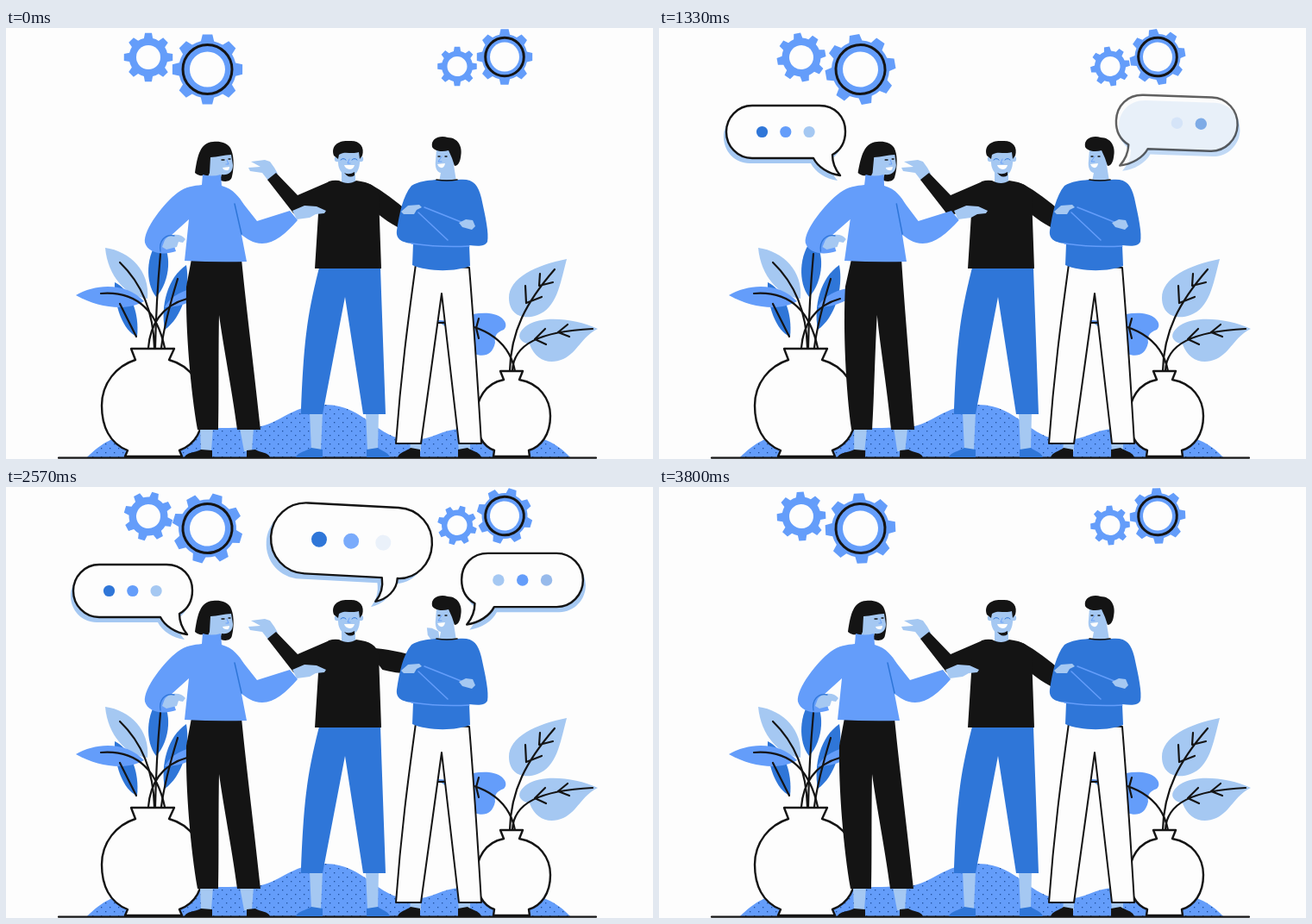
Recreate the animation shown at these times as an HTML page with a canvas. Size 750x500 px, loop 3.83 s.

```html
<!DOCTYPE html>
<html lang="en">
<head>
<meta charset="utf-8">
<title>Team talk</title>
<style>
html, body { margin: 0; width: 100%; height: 100%; overflow: hidden; background: #fdfdfd; }
canvas { display: block; width: 750px; height: 500px; }
</style>
</head>
<body>
<canvas id="stage" width="750" height="500"></canvas>
<script>
const ctx = document.getElementById('stage').getContext('2d');
const LOOP = 3830;
const PAPER = '#fdfdfd', INK = '#141414', SKY = '#649dfa', BLUE = '#2f76d8', PALE = '#a5c8f2';

const clamp = v => Math.max(0, Math.min(1, v));
const smooth = v => { v = clamp(v); return v * v * (3 - 2 * v); };
const hold = (t, a, b, c, d) => smooth((t - a) / (b - a)) * (1 - smooth((t - c) / (d - c)));

const cache = {};
const path = d => cache[d] || (cache[d] = new Path2D(d));
function fill(color, d) { ctx.fillStyle = color; ctx.fill(path(d)); }
function line(d, color = INK, w = 2.2) {
  ctx.strokeStyle = color;
  ctx.lineWidth = w;
  ctx.stroke(path(d));
}
function outlined(d, w = 2.4) { fill(PAPER, d); line(d, INK, w); }
function disc(x, y, r, color) {
  ctx.fillStyle = color;
  ctx.beginPath();
  ctx.arc(x, y, r, 0, Math.PI * 2);
  ctx.fill();
}
function turned(x, y, deg, draw) {
  ctx.save();
  ctx.translate(x, y);
  ctx.rotate(deg * Math.PI / 180);
  ctx.translate(-x, -y);
  draw();
  ctx.restore();
}

function gear(x, y, R, body, hole, ring, spin) {
  ctx.save();
  ctx.translate(x, y);
  ctx.rotate(spin);
  ctx.fillStyle = SKY;
  ctx.beginPath();
  for (let i = 0; i < 8; i++) {
    const a = i * Math.PI / 4;
    for (const [r, off] of [[body, -.23], [R, -.14], [R, .14], [body, .23]])
      ctx.lineTo(r * Math.cos(a + off), r * Math.sin(a + off));
    ctx.arc(0, 0, body, a + .23, a + Math.PI / 4 - .23);
  }
  ctx.fill();
  disc(0, 0, hole, PAPER);
  if (ring) {
    ctx.strokeStyle = INK;
    ctx.lineWidth = 3;
    ctx.beginPath();
    ctx.arc(0, 0, ring, 0, Math.PI * 2);
    ctx.stroke();
  }
  ctx.restore();
}

function gears(t) {
  const spin = t / LOOP * Math.PI * 2;
  gear(165, 34, 28.5, 22.5, 14, 0, spin);
  gear(233.5, 48, 41, 33.5, 20.5, 28.5, spin);
  gear(523, 44.5, 23, 18, 11.5, 0, spin);
  gear(578, 33.5, 32.5, 26.5, 17, 22.3, spin);
}

const HILL = 'M93 499C112 480 125 474 150 470C200 463 250 465 290 463C318 460 328 438 370 437C418 438 428 477 470 478C495 478 505 465 530 465C550 465 555 472 570 474C615 466 640 482 655 499Z';
function ground() {
  fill(SKY, HILL);
  ctx.save();
  ctx.clip(path(HILL));
  ctx.fillStyle = '#1f4f9c';
  for (let row = 0; row < 14; row++)
    for (let x = 90 + row % 2 * 5; x < 660; x += 10) ctx.fillRect(x, 437 + row * 5, 1.3, 1.3);
  ctx.restore();
  line('M61 498.700H684');
}

function leftPlant() {
  fill(BLUE, 'M126 295C143 303 155 328 152 358C136 352 125 322 126 295Z');
  fill(BLUE, 'M178 245C193 258 191 294 174 312C161 296 162 262 178 245Z');
  fill(BLUE, 'M209 275C214 302 204 336 184 350C179 322 187 290 209 275Z');
  fill(SKY, 'M184 324C192 308 212 300 237 301C224 315 204 324 184 324Z');
  fill(PALE, 'M115 255C144 259 167 282 164 314C139 311 118 288 115 255Z');
  fill(SKY, 'M81 310C104 296 140 295 160 317C140 329 108 325 81 310Z');
  line('M132 320L151 358M179 262Q174 318 173 371M199 291Q184 340 180 371M132 272C157 296 171 330 172 371');
  line('M110 308C148 305 174 325 184 371M210 314C180 322 167 345 165 371');
  outlined('M145 372H195L189 385C215 392 229 415 229 440C229 465 220 483 201 490L204 497H138L141 490C120 482 111 462 111 438C111 412 128 392 150 385Z');
}

function rightPlant() {
  fill(PALE, 'M650 268C614 275 583 290 583 313C583 334 601 339 616 333C638 325 642 299 650 268Z');
  fill(PALE, 'M686 349C660 337 622 333 604 345C590 355 594 364 607 367C614 386 630 391 646 384C663 376 667 358 686 349Z');
  fill(SKY, 'M497 338C520 344 532 329 560 331C578 333 583 345 577 350C568 353 566 358 567 365C564 380 553 382 543 378C525 365 515 345 497 340Z');
  line('M636 280C603 318 585 352 584 398M618 299L619 285M618 299L634 295M603 319L602 299M603 319L621 312');
  line('M680 349C620 352 588 366 587 398M640 353L651 344M640 353L653 358M613 361L625 349M613 361L626 367');
  line('M500 342C548 340 583 360 590 398M545 348L548 337M545 348L548 360');
  outlined('M573 398H599L595 408C618 412 631 430 631 450C631 472 620 486 606 490L607 497H565L566 490C552 485 545 470 545 452C545 430 556 412 577 408Z');
}

function middleMan(t) {
  const wave = smooth(1 - Math.abs(t - 770) / 470);
  const reach = hold(t, 2000, 2500, 3250, 3700);

  turned(430, 195, -27 * reach, () => {
    fill(PALE, 'M493 201L496 193L501 196L506 203L503 212L494 208Z');
    fill(INK, 'M422 181C438 190 452 201 465 212L460 234C447 228 437 221 428 213Z');
  });

  fill(PALE, 'M352 446H367L365 490H354ZM417 446H432L431 490H419Z');
  fill(BLUE, 'M336 498C338 492 348 491 354 487L367 489V498ZM418 498V489L431 487C436 491 443 492 445 498Z');
  fill(BLUE, 'M363 278H434L440 448H414L393 312L367 448H342C345 360 350 330 363 278Z');
  fill(PALE, 'M389 161H405V181H389Z');
  turned(375, 191, -12 * wave, () => {
    fill(PALE, 'M304 177L297 168L283 166L281 162L295 161L284 155L300 153L306 155L311 162L315 169Z');
    fill(INK, 'M303 176L313 168L338 194L375 178L380 205L342 216Q335 219 331 212Z');
  });
  fill(INK, 'M386 177C393 181 400 181 406 177C422 179 430 184 432 194L435 279H358L363 200L374 178Q380 176 386 177Z');

  disc(384, 152, 3.2, PALE);
  disc(411, 152, 3.2, PALE);
  fill(PALE, 'M385 143H410V157C409 167 404 172 398 172C391 172 385 165 385 156Z');
  fill(INK, 'M392 168Q398 171 404 167V171Q399 174 395 171Z');
  fill(INK, 'M380 148C376 136 386 130 398 131C410 130 416 138 413 148L410 152L409 144C400 147 393 142 386 147L385 152Z');
  line('M388 153Q391 150 394 153M401 153Q404 150 407 153', BLUE, 1);
  line('M398 152L396 157H399', SKY, .9);
  fill(PAPER, 'M392 159H404Q403 164 398 164Q393 163 392 159Z');
}

function woman(t) {
  const lean = .0352 * hold(t, 250, 700, 1400, 1740);
  ctx.save();
  ctx.transform(1, 0, -lean, 1, lean * 497, 0);

  fill(PALE, 'M225 464H240L238 491H226ZM271 464H287L285 491H276Z');
  fill(INK, 'M207 498C209 492 219 493 226 489L239 490V498ZM279 498V490L289 489C295 493 304 492 306 498Z');
  fill(INK, 'M215 268H273C278 320 288 400 295 466H268C262 420 252 370 247 333C246 380 247 430 246 466H222C214 420 208 350 209 300Z');

  fill(INK, 'M240 132C225 133 222 148 219 168C224 173 231 171 236 172L249 177C255 179 261 178 262 172C265 160 264 146 260 139C256 133 248 131 240 132Z');
  fill(PALE, 'M237 150C245 150 253 147 261 147L263 159C263 167 258 171 250 170L248 177H232L236 168Z');
  line('M250 153H253M258 152H260', INK, 1.3);
  line('M256 153L258 158H255', SKY, .9);
  fill(PAPER, 'M251 162L259 161Q259 166 255 165Q252 165 251 162Z');

  fill(PALE, 'M332 212L346 206L360 207L371 212L369 215L359 216L352 220L337 222Z');
  fill(SKY, 'M228 170Q238 173 249 170L250 183C264 187 270 196 276 205L291 224L329 212L338 223C325 238 311 250 297 250C286 250 279 244 273 240L279 271Q243 272 207 270L212 222L191 241L197 259C183 264 165 262 161 249C159 234 183 203 199 191C208 184 218 183 227 182Z');
  fill(PALE, 'M184 246C190 238 203 238 208 245L205 249L200 248L198 254L186 257L181 254Z');
  line('M265 204L273 239', BLUE, 1.5);
  line('M195 241C184 239 177 247 179 259', BLUE, 1.3);
  ctx.restore();
}

function rightMan() {
  fill(PALE, 'M469 480H481V491H468ZM524 480H538V491H525Z');
  fill(INK, 'M454 498C456 492 464 491 469 487L480 489V498ZM524 498V489L535 487C541 491 549 492 551 498Z');
  outlined('M475 274L537 278C542 340 547 415 551 482H525L505 308L481 482H452C458 400 466 340 475 274Z', 2);

  fill(PALE, 'M499 141L514 140L518 150C523 148 524 156 519 159L522 178H502L504 168C499 167 497 161 498 154Z');
  fill(INK, 'M494 138C492 128 503 124 512 127C524 127 530 138 527 150C526 157 523 160 520 160L517 151L513 142C505 144 497 143 494 138Z');
  line('M501 149H503M509 149H511', INK, 1.3);
  line('M505 149L501 155H505', SKY, .9);
  fill(PAPER, 'M500 158L509 157Q508 163 504 162Q501 161 500 158Z');

  fill(BLUE, 'M498 176H524C541 174 547 181 551 197C556 220 560 238 558 248C555 254 546 253 537 252L538 276C522 283 488 283 471 275L472 250C456 249 452 243 453 235C456 215 460 195 470 183C478 178 488 177 498 176Z');
  line('M499 176Q511 178 523 176', INK, 1.6);
  line('M485 208L535 228M478 214L512 246M470 250Q505 255 537 253', SKY, 1.5);
  fill(PALE, 'M458 213L466 206L479 205L482 208L476 211L473 216L461 216Z');
  fill(PALE, 'M525 226L533 222L541 223L544 230L540 234L529 231Z');
}

const SMALL = {
  shape: 'M108 90H186C204 90 216 103 216 120C216 133 210 142 201 147C201 157 205 165 210 171C196 169 184 161 179 151H108C91 151 78 137 78 120.500C78 104 91 90 108 90Z',
  pivot: [210, 171], dots: [119.5, 120.5, 27.3, 6.6], shade: [-3, 6]
};
const LARGE = {
  shape: 'M344 26H449C473 26 490 45 490 67C490 89 474 108 452 108C452 122 441 133 428 136C434 128 436 118 434 108H344C321 108 303 90 303 67C303 44 321 26 344 26Z',
  pivot: [490, 140], dots: [359, 67.5, 37.2, 9], shade: [-5, 6.5]
};

// Dots fade in one by one, blink out in the same order, then return.
function dotAlpha(age, p, i) {
  const out = clamp((age - 1325 - i * 230) / 230);
  const back = clamp((age - 2080 - i * 100) / 150);
  return clamp(3 * (p - .05 - .215 * i)) * (1 - out + back * out);
}

function bubble(t, start, tilt, kind) {
  const age = t - start, p = clamp(age / 600);
  const alpha = clamp(p * 2) * (1 - smooth((t - 3430) / 290));
  if (alpha <= 0) return;
  turned(...kind.pivot, tilt * (1 - p) * (1 - p), () => {
    ctx.globalAlpha = alpha;
    ctx.save();
    ctx.translate(...kind.shade);
    fill(PALE, kind.shape);
    ctx.restore();
    outlined(kind.shape);
    const [x, y, gap, r] = kind.dots;
    [BLUE, SKY, PALE].forEach((c, i) => {
      ctx.globalAlpha = alpha * dotAlpha(age, p, i);
      disc(x + gap * i, y, r, c);
    });
  });
}

function bubbles(t) {
  bubble(t, 100, -4.5, SMALL);
  ctx.save();
  ctx.translate(598.5, 108);
  ctx.scale(-1.02, 1.02);
  ctx.translate(-147, -120.5);
  bubble(t, 1130, -4.5, SMALL);
  ctx.restore();
  bubble(t, 2240, 15, LARGE);
}

function draw(t) {
  ctx.globalAlpha = 1;
  ctx.fillStyle = PAPER;
  ctx.fillRect(0, 0, 750, 500);
  ctx.lineCap = ctx.lineJoin = 'round';
  gears(t);
  ground();
  leftPlant();
  rightPlant();
  middleMan(t);
  woman(t);
  rightMan();
  bubbles(t);
}

const begin = performance.now();
function tick() {
  draw((performance.now() - begin) % LOOP);
  requestAnimationFrame(tick);
}
tick();
</script>
</body>
</html>
```
